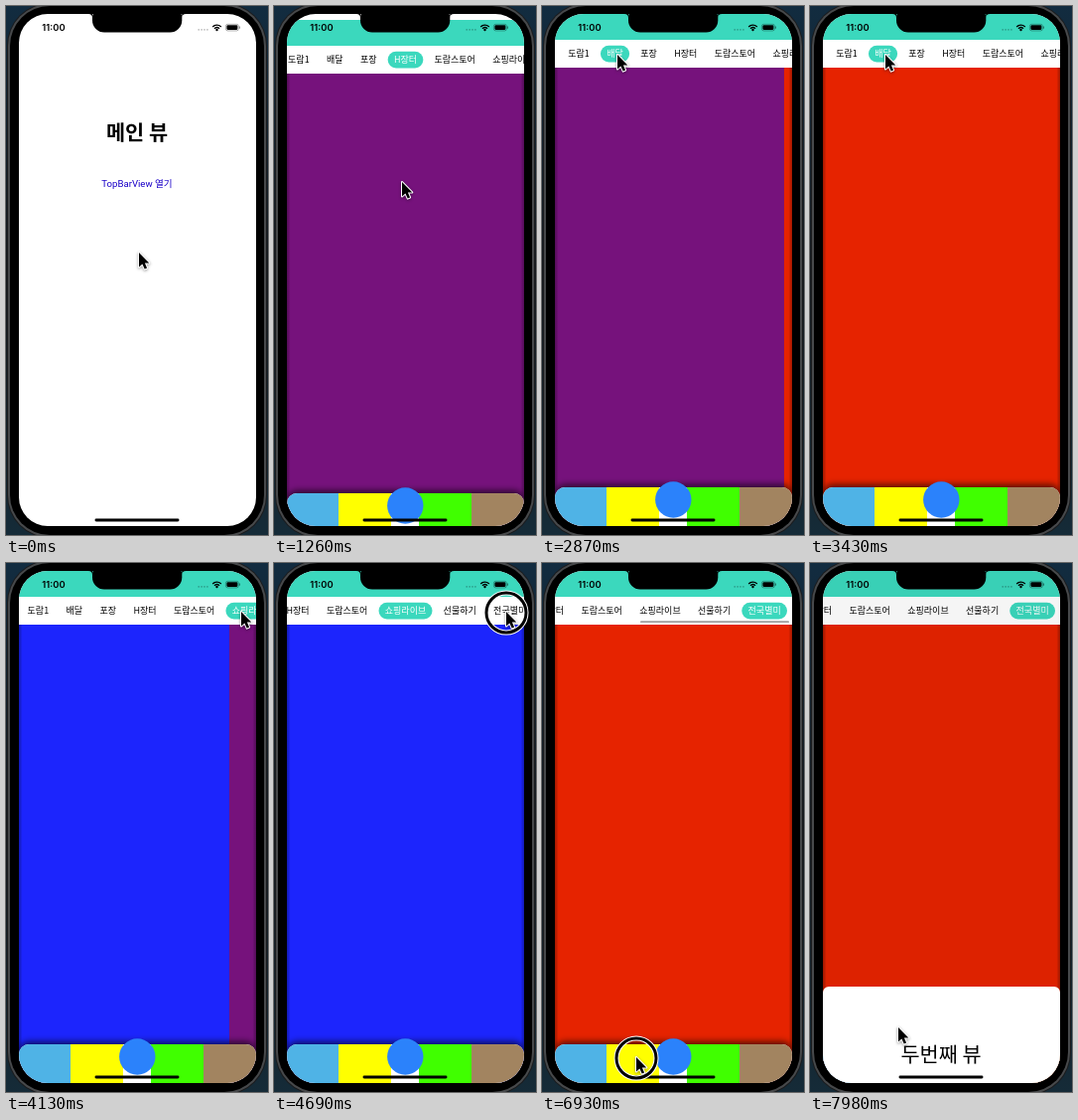
An HTML page with a canvas that plays this animation: 264x532 px, repeating every 8 s.

```html
<!DOCTYPE html>
<html lang="ko">
<head>
<meta charset="utf-8">
<title>TopBarView</title>
<style>
  html, body { margin: 0; width: 264px; height: 532px; overflow: hidden; background: #000; }
  canvas { display: block; width: 264px; height: 532px; }
</style>
</head>
<body>
<canvas id="stage"></canvas>
<script>
const W = 264, H = 532, LOOP = 8000, STEP = 70;
const canvas = document.getElementById('stage');
const ratio = window.devicePixelRatio || 1;
canvas.width = W * ratio;
canvas.height = H * ratio;
const g = canvas.getContext('2d');

const KO = '"Noto Sans CJK KR", "Noto Sans CJK JP", "Noto Sans CJK", sans-serif';
const TAB_FONT = `9px ${KO}`;
const LEFT = 13, TOP = 8, WIDTH = 239, HEIGHT = 515;
const RIGHT = LEFT + WIDTH, BOTTOM = TOP + HEIGHT, MID = LEFT + WIDTH / 2;
const HEAD = 34, BODY = 62, BAR = 484, SHEET = 42;

const TEAL = '#3bd8bd';
const PAGES = ['#76127c', '#e62300', '#1c25fd'];
const BUTTONS = ['#4fb3e6', '#ffff00', '#ffffff', '#40ff00', '#a28460'];
const LABELS = ['도람1', '배달', '포장', 'H장터', '도람스토어', '쇼핑라이브', '선물하기', '전국별미'];

// tabs laid out left to right with an even gap
const PAD = 6.3, GAP = 17.4;
let edge = LEFT + 7 + PAD;
g.font = TAB_FONT;
const tabs = LABELS.map(label => {
  const tab = { label, x: edge, w: g.measureText(label).width };
  edge += tab.w + GAP;
  return tab;
});
const MAX_SCROLL = edge - GAP + PAD + 5 - RIGHT;

const PRESS = 140, SLIDE = 350, FIRST_TAB = 3;
const OPEN = 770, PULL = 5810, SHEET_TAP = 6930, DRAG = 7630;
// lead: share of the page slide already done on release
const TAPS = [
  { at: 2100, tab: 0, lead: 0.13 },
  { at: 2730, tab: 1, lead: 0.13 },
  { at: 3990, tab: 5, lead: 0.373 },
  { at: 4690, tab: 7, lead: 0.13 }
];
const PRESSES = [OPEN, PULL, SHEET_TAP, ...TAPS.map(tap => tap.at)];

// pointer stops: arrival time, x, y
const STOPS = [
  [0, 134, 248], [350, 129, 177], [1610, 80, 78], [1960, 26, 48], [2590, 76, 49],
  [3850, 237, 49], [4550, 234, 49], [5250, 215, 340], [5740, 240, 48],
  [6300, 160, 48], [6790, 95, 497], [7560, 89, 83], [DRAG + SLIDE, 89, 467]
];

const clamp = (v, a = 0, b = 1) => Math.min(b, Math.max(a, v));
const ease = p => p < 0.5 ? 2 * p * p : 1 - 2 * (1 - p) * (1 - p);

// glide through values, each move taking SLIDE ms
function pointer(t) {
  let [, x, y] = STOPS[0];
  for (const [end, nx, ny] of STOPS.slice(1)) {
    const p = ease(clamp((t - end + SLIDE) / SLIDE));
    x += (nx - x) * p;
    y += (ny - y) * p;
  }
  return { x, y };
}

function follow(t, valueOf, leadOf) {
  let value = valueOf(FIRST_TAB);
  for (const tap of TAPS) {
    const since = t - tap.at - PRESS;
    if (since >= 0) value += (valueOf(tap.tab) - value) * ease(clamp(since / SLIDE + leadOf(tap)));
  }
  return value;
}

const pageAt = t => follow(t, i => i, tap => tap.lead);

function scrollAt(t) {
  const centred = i => clamp(tabs[i].x + tabs[i].w / 2 - MID, 0, MAX_SCROLL);
  const bounce = Math.sin(Math.PI * clamp((t - PULL - PRESS) / 700));
  return follow(t, centred, () => 0.14) + 30 * bounce * bounce;
}

// remaining share of a critically damped spring
function spring(ms) {
  const k = Math.max(0, ms) * 0.0187;
  return (1 + k) * Math.exp(-k);
}

function rect(x, y, w, h, color) {
  g.fillStyle = color;
  g.fillRect(x, y, w, h);
}

function round(x, y, w, h, r, color) {
  g.beginPath();
  g.roundRect(x, y, w, h, r);
  if (color) { g.fillStyle = color; g.fill(); }
}

function disc(x, y, r, color) {
  g.beginPath();
  g.arc(x, y, r, 0, Math.PI * 2);
  g.fillStyle = color;
  g.fill();
}

function text(s, x, y, font, color) {
  g.font = font;
  g.fillStyle = color;
  g.textAlign = 'center';
  g.fillText(s, x, y);
}

function drawPhone() {
  const sky = g.createLinearGradient(0, 0, 0, H);
  sky.addColorStop(0, '#122c40');
  sky.addColorStop(0.5, '#14181c');
  sky.addColorStop(1, '#152b38');
  rect(0, 0, W, H, sky);
  ['#1b1c1e', '#47494b', '#000'].forEach((color, i) => {
    const inset = [1, 2, 4][i];
    round(inset, inset - 4, W - 2 * inset, H + 8 - 2 * inset, 44 - inset, color);
  });
}

function drawMain() {
  rect(LEFT, TOP, WIDTH, HEIGHT, '#fff');
  text('메인 뷰', 132, 134.5, `bold 20.8px ${KO}`, '#000');
  text('TopBarView 열기', 132, 181.5, `9.6px Roboto, ${KO}`, '#1a00c8');
}

function drawPages(pos) {
  const first = Math.floor(pos);
  for (let i = first; i <= first + 1; i++) {
    rect(LEFT + (i - pos) * WIDTH, BODY, WIDTH + 0.5, H, PAGES[i % 3]);
  }
  const shade = g.createLinearGradient(LEFT, 0, RIGHT, 0);
  for (const [at, alpha] of [[0, 0.3], [0.015, 0], [0.985, 0], [1, 0.3]]) {
    shade.addColorStop(at, `rgba(0,0,0,${alpha})`);
  }
  rect(LEFT, BODY, WIDTH, H, shade);
}

function drawTabs(t) {
  const offset = scrollAt(t);
  const chosen = TAPS.reduce((tab, tap) => t >= tap.at + PRESS ? tap.tab : tab, FIRST_TAB);
  rect(LEFT, TOP, WIDTH, HEAD - TOP, TEAL);
  rect(LEFT, HEAD, WIDTH, BODY - HEAD, '#fff');
  tabs.forEach(({ label, x, w }, i) => {
    const on = i === chosen;
    if (on) round(x - offset - PAD, 39.8, w + 2 * PAD, 16.6, 8.3, TEAL);
    text(label, x - offset + w / 2, 51.4, TAB_FONT, on ? '#fff' : '#000');
  });
  const seen = clamp((t - PULL) / PRESS) * clamp((7280 - t) / 280);
  if (seen > 0) {
    const x = 99 + (offset - MAX_SCROLL) * 0.63;
    round(x, 58.2, 249 - x, 1.9, 0.95, `rgba(0,0,0,${0.38 * seen})`);
  }
}

function drawBottomBar() {
  g.save();
  g.shadowColor = 'rgba(0,0,0,.6)';
  g.shadowBlur = 6 * ratio;
  g.shadowOffsetY = -3 * ratio;
  round(LEFT, BAR, WIDTH, 60, 10, '#fff');
  g.restore();
  g.save();
  round(LEFT, BAR, WIDTH, 60, 10);
  g.clip();
  const gap = 28, side = (WIDTH - gap) / 4;
  let x = LEFT;
  BUTTONS.forEach((color, i) => {
    rect(Math.floor(x), BAR, side + 1, 60, color);
    x += i === 2 ? gap : side;
  });
  g.restore();
  disc(132.3, 496.5, 18.2, '#2b82fb');
}

function drawCover(t) {
  const since = t - OPEN - PRESS;
  if (since < 0) return;
  g.save();
  g.translate(0, Math.round(HEIGHT * spring(since)));
  drawPages(pageAt(t));
  drawTabs(t);
  drawBottomBar();
  g.restore();
}

function drawStatus() {
  text('11:00', 48, 24.7, '600 9.4px Inter, "Noto Sans", sans-serif', '#000');
  for (let i = 0; i < 4; i++) disc(194.2 + i * 2.9, 23.8, 0.85, 'rgba(0,0,0,.28)');
  g.strokeStyle = '#000';
  g.lineWidth = 1.4;
  for (const r of [3.4, 5.9]) {
    g.beginPath();
    g.arc(212.5, 25, r, -Math.PI * 0.76, -Math.PI * 0.24);
    g.stroke();
  }
  disc(212.5, 24, 1.2, '#000');
  g.lineWidth = 0.7;
  g.strokeStyle = 'rgba(0,0,0,.45)';
  round(221.4, 18.3, 13, 6.6, 2);
  g.stroke();
  round(222.4, 19.3, 11, 4.6, 1.1, '#000');
  rect(235, 20.5, 1, 2.2, 'rgba(0,0,0,.45)');
}

function drawSheet(t) {
  const rising = SHEET + (BOTTOM - SHEET) * spring(t - SHEET_TAP - PRESS);
  const top = t < DRAG ? rising : pointer(t).y - 41;
  if (top >= BOTTOM) return;
  const shown = (BOTTOM - top) / (BOTTOM - SHEET);
  rect(LEFT, TOP, WIDTH, HEIGHT, `rgba(0,0,0,${0.2 * shown})`);
  round(LEFT, top, WIDTH, H, 6, '#fff');
  text('두번째 뷰', 132, top + 75.5, `20.8px ${KO}`, '#000');
}

function drawNotch() {
  const x = 87, w = 90.3;
  round(x, 0, w, 26.6, 12, '#000');
  for (const [side, dir] of [[x, -1], [x + w, 1]]) {
    g.beginPath();
    g.moveTo(side + dir * 4, TOP);
    g.quadraticCurveTo(side, TOP, side, TOP + 4);
    g.lineTo(side, TOP);
    g.fill();
  }
}

function drawCursor(t) {
  const { x, y } = pointer(t);
  if (PRESSES.some(at => t >= at && t < at + PRESS)) {
    for (const [color, width] of [['#fff', 5], ['#000', 3]]) {
      g.beginPath();
      g.arc(x, y + 1, 20, 0, Math.PI * 2);
      g.strokeStyle = color;
      g.lineWidth = width;
      g.stroke();
    }
  }
  g.save();
  g.translate(x, y);
  g.beginPath();
  [[0, 0], [0, 14.5], [3.4, 11.4], [5.7, 16.6], [8.1, 15.5], [5.9, 10.5], [10.3, 10.4]]
    .forEach(p => g.lineTo(...p));
  g.closePath();
  g.lineJoin = 'round';
  g.strokeStyle = '#fff';
  g.lineWidth = 2;
  g.shadowColor = 'rgba(0,0,0,.4)';
  g.shadowBlur = 3 * ratio;
  g.shadowOffsetY = ratio;
  g.stroke();
  g.shadowColor = 'transparent';
  g.fillStyle = '#000';
  g.fill();
  g.restore();
}

function draw(t) {
  g.setTransform(ratio, 0, 0, ratio, 0, 0);
  drawPhone();
  g.save();
  round(LEFT, TOP, WIDTH, HEIGHT, 29);
  g.clip();
  drawMain();
  drawCover(t);
  drawStatus();
  drawSheet(t);
  g.restore();
  drawNotch();
  round(89.5, 515.5, 85, 2.9, 1.45, '#000');
  drawCursor(t);
}

const start = performance.now();
function tick() {
  const t = (performance.now() - start) % LOOP;
  draw(Math.floor(t / STEP) * STEP);
  requestAnimationFrame(tick);
}
tick();
</script>
</body>
</html>
```
